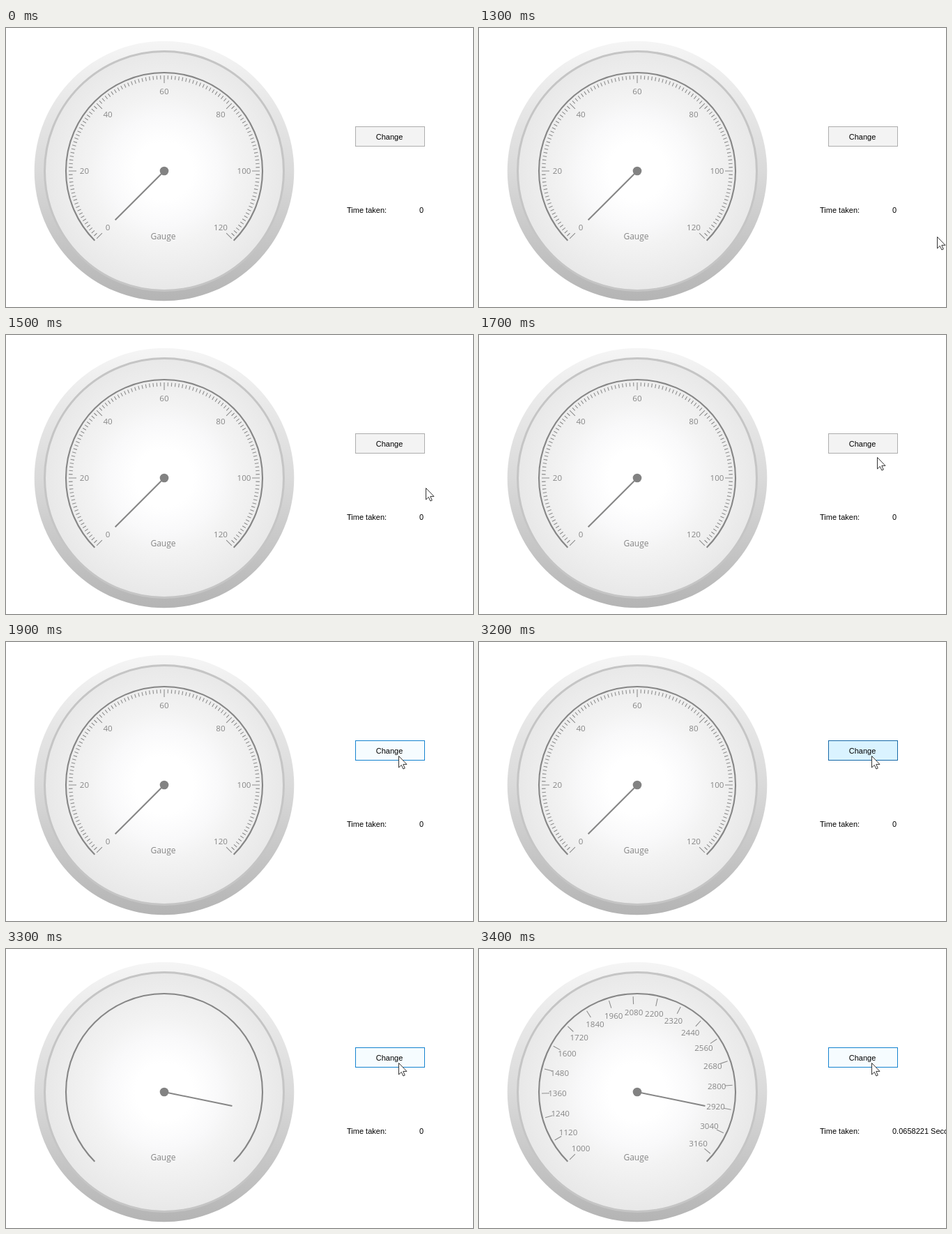
An HTML page for the animation above (6.3 s loop, 670 by 400 pixels).

```html
<!DOCTYPE html>
<html lang="en">
<head>
<meta charset="utf-8">
<title>Gauge</title>
<style>
  html, body { margin: 0; width: 100%; height: 100%; overflow: hidden; background: #fff; }
  svg { display: block; width: 670px; height: 400px; }
  .ink { fill: none; stroke: #868686; stroke-width: 2.1; }
  .ticks { fill: none; stroke: #8e8e8e; stroke-width: 1.1; }
  .label { font: 11.6px "Open Sans", "Noto Sans", sans-serif; fill: #868686; text-anchor: middle; }
  .title { font-size: 12px; }
  .form { font: 11px "Liberation Sans", Arial, sans-serif; fill: #000; }
  .mid { text-anchor: middle; }
</style>
</head>
<body>
<svg viewBox="0 0 670 400">
  <defs>
    <linearGradient id="rim" x1="0" y1="0" x2="0" y2="1">
      <stop offset="0" stop-color="#f5f5f5"/>
      <stop offset=".5" stop-color="#dadada"/>
      <stop offset="1" stop-color="#b4b4b4"/>
    </linearGradient>
    <radialGradient id="face">
      <stop offset=".24" stop-color="#fff"/>
      <stop offset=".46" stop-color="#f9f9fa"/>
      <stop offset=".62" stop-color="#f3f3f3"/>
      <stop offset="1" stop-color="#e8e8e8"/>
    </radialGradient>
  </defs>
  <circle cx="227" cy="205" r="186.3" fill="url(#rim)"/>
  <circle cx="227" cy="205" r="171.5" fill="url(#face)" stroke="#c5c5c5" stroke-width="3"/>
  <path class="ink" d="M127.3 304.7A141 141 0 1 1 326.7 304.7"/>
  <g id="before"></g>
  <g id="after"></g>
  <text class="label title" x="225.5" y="303">Gauge</text>
  <line id="needle" class="ink" x1="227" y1="205" x2="326.5" y2="205"/>
  <circle cx="227" cy="205" r="6.3" fill="#828282"/>
  <rect id="button" x="501.5" y="141.5" width="99" height="28"/>
  <text class="form mid" x="550" y="160">Change</text>
  <text class="form" x="489" y="265">Time taken:</text>
  <text class="form" id="taken" x="593" y="265">0</text>
  <path id="pointer" d="M.5.5V17L4.3 13.4 6.9 19 9.3 18 6.8 12.4H12Z" fill="#fff" stroke="#333" stroke-width="1"/>
</svg>
<script>
const LOOP = 6300, STEP = 100;
const MOVE = 1300, ARRIVE = 1900, PRESS = 3200, RELEASE = 3300, DONE = 3400;
const CX = 227, CY = 205;
const $ = id => document.getElementById(id);
const angle = (v, min, max) => 135 + 270 * (v - min) / (max - min);

function at(deg, r) {
  const a = deg * Math.PI / 180;
  return [(CX + r * Math.cos(a)).toFixed(2), (CY + r * Math.sin(a)).toFixed(2)];
}

function drawScale(group, min, max, major, minor) {
  let d = "", labels = "";
  for (let v = min; v <= max; v += minor) {
    const deg = angle(v, min, max), big = (v - min) % major === 0;
    d += `M${at(deg, 137)}L${at(deg, big ? 126 : 131.5)}`;
    if (big) {
      const [x, y] = at(deg, 114.5);
      labels += `<text class="label" x="${x}" y="${+y + 4.3}">${v}</text>`;
    }
  }
  group.innerHTML = `<path class="ticks" d="${d}"/>` + labels;
}

const LOOKS = {
  idle: ["#f3f3f3", "#adadad"],
  hover: ["#f6fcff", "#1583d0"],
  down: ["#daf3ff", "#1668a8"]
};

function setButton(name) {
  const [fill, stroke] = LOOKS[name];
  $("button").setAttribute("fill", fill);
  $("button").setAttribute("stroke", stroke);
}

const show = (el, on) => el.setAttribute("visibility", on ? "visible" : "hidden");

function render(t) {
  // The screen refreshes in 100 ms steps.
  t = Math.floor(t / STEP) * STEP;

  const u = Math.min(1, Math.max(0, (t - MOVE) / (ARRIVE - MOVE)));
  const left = Math.pow(1 - u, 2.2);
  const x = Math.round(563 + 94 * left), y = Math.round(163 + 136 * left);
  show($("pointer"), t >= MOVE);
  $("pointer").setAttribute("transform", `translate(${x} ${y})`);

  const pressed = t >= PRESS && t < RELEASE;
  setButton(pressed ? "down" : t >= MOVE && y < 170 ? "hover" : "idle");

  show($("before"), t < RELEASE);
  show($("after"), t >= DONE);
  const deg = t < RELEASE ? 135 : angle(2928, 1000, 3200);
  $("needle").setAttribute("transform", `rotate(${deg} ${CX} ${CY})`);
  $("taken").textContent = t < DONE ? "0" : "0.0658221 Seconds";
}

drawScale($("before"), 0, 120, 20, 1);
drawScale($("after"), 1000, 3200, 120, 120);

const start = performance.now();
function tick() {
  render((performance.now() - start) % LOOP);
  requestAnimationFrame(tick);
}
tick();
</script>
</body>
</html>
```
